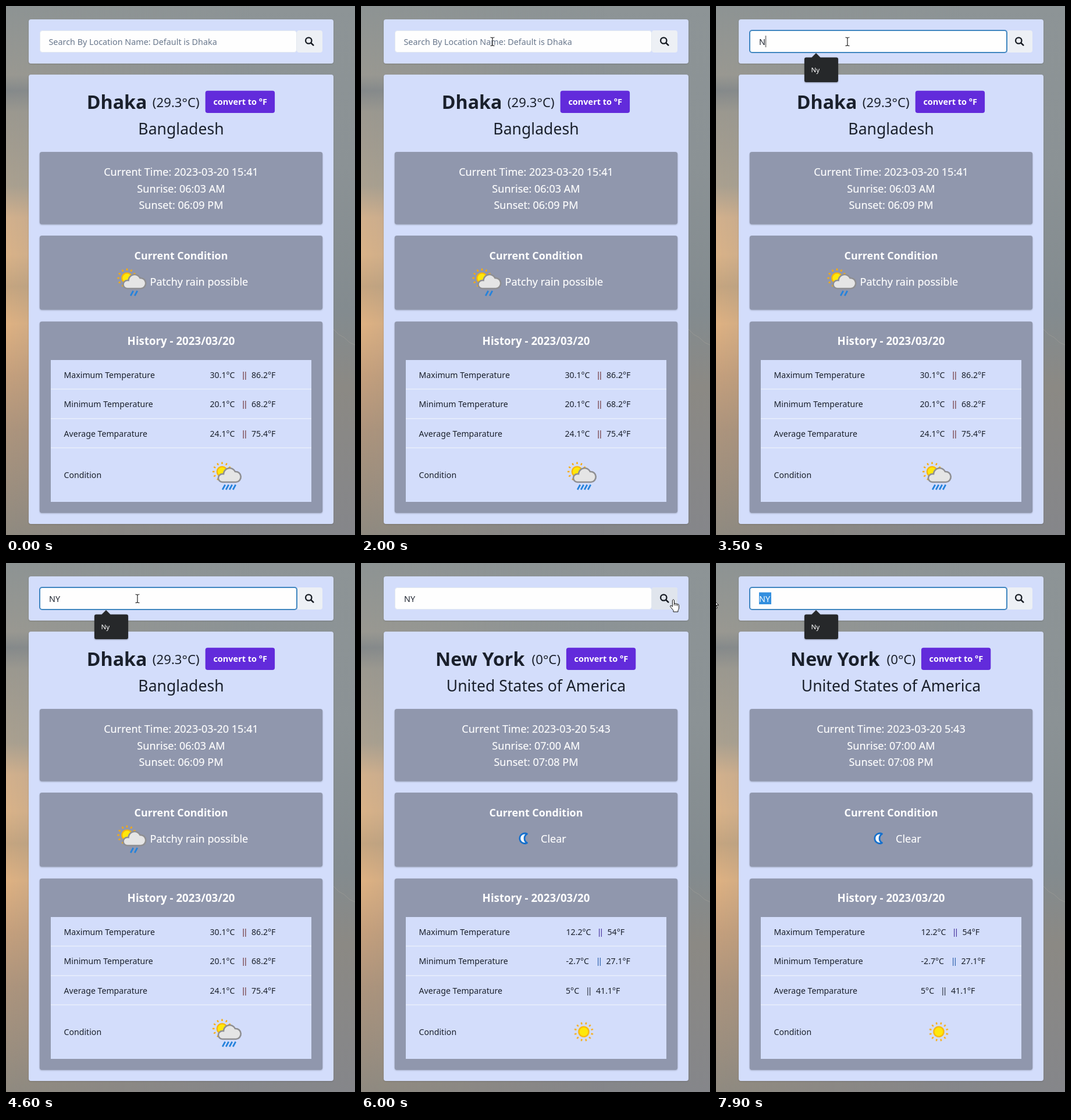
An HTML page for the animation above (8000 ms loop, 600 px wide and 910 px high).

```html
<!DOCTYPE html>
<html lang="en">
<head>
<meta charset="utf-8">
<title>Weather search</title>
<style>
html, body { margin: 0; width: 100%; height: 100%; overflow: hidden; background: #8b9092; }
svg { display: block; width: 600px; height: 910px; font-family: "Noto Sans", "Open Sans", sans-serif; }
.card { fill: #d3ddfb; filter: drop-shadow(0 1px 1px rgba(0,0,0,.15)); }
.panel { fill: #9097ad; filter: drop-shadow(0 1px 1px rgba(0,0,0,.22)); }
.mid { text-anchor: middle; }
.info { font-size: 18.05px; fill: #fff; stroke: #fff; stroke-width: .15px; }
.head { font-size: 17.9px; font-weight: 700; fill: #fff; text-anchor: middle; }
.dark { fill: #1a202c; }
.city { font-size: 32.2px; font-weight: 700; }
.deg { font-size: 22.2px; font-weight: 500; text-anchor: middle; }
.land { font-size: 26.6px; text-anchor: middle; }
.conv { font-size: 14.5px; font-weight: 600; fill: #fff; text-anchor: middle; }
.row { font-size: 14.15px; }
.bar { font-family: "Liberation Sans", Arial, sans-serif; font-size: 14.5px; fill: #6e3338; }
.field { font-size: 14.35px; }
.menu text { font-size: 11.65px; fill: #fff; }
.menu path { fill: #26282a; filter: drop-shadow(0 1px 1px rgba(0,0,0,.35)); }
.ray { stroke: #f9ab0b; stroke-width: 2.4; }

.anim { animation: 8s step-end infinite; }
#before { animation-name: before; }
#after { animation-name: after; }
#focus { animation-name: focus; }
#wide { animation-name: wide; }
#slim { animation-name: slim; animation-timing-function: linear; }
#hint { animation-name: hint; }
#typed { animation-name: typed; }
#second { animation-name: second; }
#caret { animation-name: caret; }
#caretx { animation-name: caretx; }
#chosen { animation-name: chosen; }
#hover, #hand { animation-name: hover; }
#pointer { animation-name: pointer; animation-timing-function: ease-in-out; }
#arrow { animation-name: arrow; }
#beam { animation-name: beam; }

@keyframes before { 0% { opacity: 1 } 73.75%, 100% { opacity: 0 } }
@keyframes after { 0% { opacity: 0 } 73.75%, 100% { opacity: 1 } }
@keyframes focus { 0% { opacity: 0 } 27.5% { opacity: 1 } 67.5% { opacity: 0 } 91.25%, 100% { opacity: 1 } }
@keyframes wide { 0% { opacity: 0 } 28.75% { opacity: 1 } 41.25%, 100% { opacity: 0 } }
@keyframes slim {
  0%, 41.24% { opacity: 0 } 41.25%, 67.5% { opacity: 1 }
  70%, 92.49% { opacity: 0 } 92.5%, 100% { opacity: 1 }
}
@keyframes hint { 0% { opacity: 1 } 41.25%, 100% { opacity: 0 } }
@keyframes typed { 0% { opacity: 0 } 41.25%, 100% { opacity: 1 } }
@keyframes second { 0% { fill-opacity: 0 } 47.5%, 100% { fill-opacity: 1 } }
@keyframes caret {
  0% { opacity: 0 } 27.5% { opacity: 1 } 33.75% { opacity: 0 } 40% { opacity: 1 }
  53.75% { opacity: 0 } 60% { opacity: 1 } 66.25% { opacity: 0 } 91.25% { opacity: 1 } 96%, 100% { opacity: 0 }
}
@keyframes caretx {
  0% { transform: translateX(74.5px) } 41.25% { transform: translateX(85.5px) }
  47.5%, 100% { transform: translateX(95.5px) }
}
@keyframes chosen { 0% { opacity: 0 } 96%, 100% { opacity: 1 } }
@keyframes hover { 0% { opacity: 0 } 64% { opacity: 1 } 87%, 100% { opacity: 0 } }
@keyframes arrow { 0% { opacity: 1 } 21.25% { opacity: 0 } 97%, 100% { opacity: 1 } }
@keyframes beam { 0% { opacity: 0 } 21.25% { opacity: 1 } 64% { opacity: 0 } 87% { opacity: 1 } 97%, 100% { opacity: 0 } }
@keyframes pointer {
  0%, 18.75% { transform: translate(-20px, 70px) }
  24.4%, 57.5% { transform: translate(226px, 61px) }
  65%, 86.25% { transform: translate(537px, 63px) }
  90.6%, 92.5% { transform: translate(226px, 61px) }
  98.75% { transform: translate(-6px, 62px) }
  100% { transform: translate(-20px, 62px) }
}
</style>
</head>
<body>
<svg viewBox="0 0 600 910">
  <defs>
    <linearGradient id="sky" x2="0" y2="1">
      <stop offset="0" stop-color="#8d9496"/><stop offset=".3" stop-color="#8b9295"/>
      <stop offset=".58" stop-color="#838b8f"/><stop offset=".72" stop-color="#8b8984"/>
      <stop offset="1" stop-color="#85868a"/>
    </linearGradient>
    <linearGradient id="dusk" x2="0" y2="1">
      <stop offset="0" stop-color="#8d9393"/><stop offset=".13" stop-color="#999891"/>
      <stop offset=".16" stop-color="#85898a"/><stop offset=".2" stop-color="#9b988f"/>
      <stop offset=".34" stop-color="#aaa08f"/><stop offset=".4" stop-color="#d2b08c"/>
      <stop offset=".47" stop-color="#d9b288"/><stop offset=".53" stop-color="#c5a580"/>
      <stop offset=".6" stop-color="#deb182"/><stop offset=".7" stop-color="#c49f7c"/>
      <stop offset=".8" stop-color="#ad947c"/><stop offset="1" stop-color="#8f8a80"/>
    </linearGradient>
    <linearGradient id="fade">
      <stop offset="0" stop-color="#fff"/><stop offset=".08" stop-color="#ddd"/><stop offset=".7" stop-color="#000"/>
    </linearGradient>
    <mask id="left"><rect width="600" height="910" fill="url(#fade)"/></mask>
    <g id="rays">
      <path id="pair" class="ray" d="M0-13V-16.5M0 13V16.5"/>
      <use href="#pair" transform="rotate(30)"/><use href="#pair" transform="rotate(60)"/>
      <use href="#pair" transform="rotate(90)"/><use href="#pair" transform="rotate(120)"/>
      <use href="#pair" transform="rotate(150)"/>
    </g>
    <g id="sun"><use href="#rays"/><circle r="8.7" fill="#ffe80a" stroke="#f8b50b" stroke-width="2.3"/></g>
    <g id="cloudy">
      <use href="#sun" x="208" y="468"/>
      <path d="M208.5 486A7 7 0 0 1 208.5 472Q209.5 471.8 210.5 472A10.5 10.5 0 0 1 230.5 468A9 9 0 0 1 232 486Z" fill="#e5e5e5" stroke="#8f8f92" stroke-width="2.6"/>
    </g>
    <path id="drop" d="M2.8-4L-1.8 4.5" stroke="#2482dc" stroke-width="2.7"/>
  </defs>

  <rect width="600" height="910" fill="url(#sky)"/>
  <rect width="600" height="910" fill="url(#dusk)" mask="url(#left)"/>
  <path d="M563 556l9 9 9 5 10 9 9 4" fill="none" stroke="#a9a49d" stroke-width=".8" opacity=".6"/>

  <rect class="card" x="39" y="23" width="524" height="76" rx="4"/>
  <rect class="card" x="39" y="118" width="524" height="773" rx="4"/>
  <rect class="panel" x="57.8" y="251" width="486.4" height="124.5" rx="4"/>
  <rect class="panel" x="57.8" y="395" width="486.4" height="127.5" rx="4"/>
  <rect class="panel" x="57.8" y="542.7" width="486.4" height="329.3" rx="4"/>
  <rect x="77" y="609" width="448" height="244" fill="#d3ddfb"/>
  <path d="M77 659H525M77 709.7H525M77 760H525" stroke="#e9effc" stroke-width="1.4"/>

  <text class="head" x="301" y="435.5">Current Condition</text>
  <text class="head" x="301" y="583.3" style="font-size:18.7px">History - 2023/03/20</text>
  <g class="row dark">
    <text x="99.5" y="640">Maximum Temperature</text>
    <text x="99.5" y="690.3">Minimum Temperature</text>
    <text x="99.5" y="740.6">Average Temparature</text>
    <text x="99.5" y="812">Condition</text>
  </g>

  <g id="before" class="anim">
    <text class="city dark" x="138.7" y="177">Dhaka</text>
    <text class="deg dark" x="292.3" y="174">(29.3°C)</text>
    <rect x="342.7" y="145.7" width="119.4" height="38.3" rx="4" fill="#622bdb"/>
    <text class="conv" x="402.7" y="170.3">convert to °F</text>
    <text class="land dark" x="301" y="221">Bangladesh</text>
    <g class="info">
      <text class="mid" x="301" y="292">Current Time: 2023-03-20 15:41</text>
      <text class="mid" x="301" y="320.7">Sunrise: 06:03 AM</text>
      <text class="mid" x="301" y="349.3">Sunset: 06:09 PM</text>
      <text x="247.5" y="480.7">Patchy rain possible</text>
    </g>
    <use href="#cloudy"/>
    <use href="#drop" x="216" y="494"/><use href="#drop" x="223" y="494"/>
    <g class="row dark">
      <text x="350.5" y="640">30.1°C</text><text class="bar" x="406.2" y="640">||</text><text x="422" y="640">86.2°F</text>
      <text x="350.5" y="690.3">20.1°C</text><text class="bar" x="406.2" y="690.3">||</text><text x="422" y="690.3">68.2°F</text>
      <text x="350.5" y="740.6">24.1°C</text><text class="bar" x="406.2" y="740.6">||</text><text x="422" y="740.6">75.4°F</text>
    </g>
    <use href="#cloudy" x="163.5" y="333"/>
    <use href="#drop" x="374" y="827.5"/><use href="#drop" x="380" y="827.5"/>
    <use href="#drop" x="386" y="827.5"/><use href="#drop" x="392" y="827.5"/>
  </g>

  <g id="after" class="anim" opacity="0">
    <text class="city dark" x="128" y="177">New York</text>
    <text class="deg dark" x="318.3" y="174">(0°C)</text>
    <rect x="352.9" y="145.7" width="119.4" height="38.3" rx="4" fill="#622bdb"/>
    <text class="conv" x="412.9" y="170.3">convert to °F</text>
    <text class="land dark" x="301" y="221">United States of America</text>
    <g class="info">
      <text class="mid" x="301" y="292">Current Time: 2023-03-20 5:43</text>
      <text class="mid" x="301" y="320.7">Sunrise: 07:00 AM</text>
      <text class="mid" x="301" y="349.3">Sunset: 07:08 PM</text>
      <text x="309" y="480.7">Clear</text>
    </g>
    <path d="M285.5 466A8.7 8.7 0 1 0 285.5 481.5A9 9 0 0 1 285.5 466Z" fill="#f4f8fc" stroke="#1670cc" stroke-width="2.8" stroke-linejoin="round"/>
    <g class="row dark">
      <text x="352.5" y="640">12.2°C</text><text class="bar" x="407.7" y="640" style="fill:#4b36a0">||</text><text x="423.5" y="640">54°F</text>
      <text x="352.5" y="690.3">-2.7°C</text><text class="bar" x="405.7" y="690.3" style="fill:#2e62ad">||</text><text x="421.5" y="690.3">27.1°F</text>
      <text x="352" y="740.6">5°C</text><text class="bar" x="388" y="740.6" style="fill:#2d3340">||</text><text x="404" y="740.6">41.1°F</text>
    </g>
    <use href="#sun" transform="translate(383 806.3) rotate(15)"/>
  </g>

  <rect x="500" y="42" width="44" height="38" rx="4" fill="#edf0f5"/>
  <rect id="hover" class="anim" x="500" y="42" width="44" height="38" rx="4" fill="#e0e5ed" opacity="0"/>
  <g fill="none" stroke="#151a22" stroke-width="2.3" stroke-linecap="round">
    <circle cx="520.3" cy="59.5" r="5.2"/><path d="M524.4 63.6L528.3 67.4" stroke-width="2.7"/>
  </g>
  <rect x="58.5" y="42.5" width="441" height="37" rx="4" fill="#fefefe" stroke="#e2e8f0"/>
  <rect id="focus" class="anim" x="58" y="42" width="442" height="38" rx="4" fill="#fefefe" stroke="#4086c0" stroke-width="2" opacity="0"/>
  <g class="field">
    <text id="hint" class="anim" x="73.5" y="66.5" fill="#68778c">Search By Location Name: Default is Dhaka</text>
    <g id="typed" class="anim dark" opacity="0"><text x="74" y="66.5">N<tspan id="second" class="anim">Y</tspan></text></g>
    <g id="chosen" class="anim" opacity="0">
      <rect x="74" y="50.5" width="21" height="20.5" fill="#338fdf"/>
      <text x="74" y="66.5" fill="#fff">NY</text>
    </g>
  </g>
  <g id="caretx" class="anim"><path id="caret" class="anim" d="M0 51V71" stroke="#222" opacity="0"/></g>

  <g id="wide" class="menu anim" opacity="0">
    <path d="M155 88.5H164.5L172 81L179.5 88.5H321a3 3 0 0 1 3 3V299a3 3 0 0 1-3 3H155a3 3 0 0 1-3-3V91.5a3 3 0 0 1 3-3Z"/>
    <text x="163.5" y="114">Mumbai</text>
    <text x="163.5" y="148.3">Babugonj</text>
    <text x="163.5" y="182.6">Ny</text>
    <text x="163.5" y="216.9">public_html/dao.spxa.info</text>
    <text x="163.5" y="251.2">public_html/ar.spxa.info</text>
    <text x="163.5" y="285.5">Rahmatpur</text>
  </g>
  <g id="slim" class="menu anim" opacity="0">
    <path d="M155 88.5H164.5L172 81L179.5 88.5H207a3 3 0 0 1 3 3V128a3 3 0 0 1-3 3H155a3 3 0 0 1-3-3V91.5a3 3 0 0 1 3-3Z"/>
    <text x="163.5" y="114">Ny</text>
  </g>

  <g id="pointer" class="anim">
    <path id="arrow" class="anim" d="M0 0V14.5L3.4 11.3L5.7 16.5L8 15.5L5.8 10.4H10.5Z" fill="#fff" stroke="#111"/>
    <path id="beam" class="anim" d="M-3.5-7Q0-7 0-5.5Q0-7 3.5-7M0-6V6M-3.5 7.5Q0 7.5 0 6Q0 7.5 3.5 7.5" fill="none" stroke="#222" stroke-width="1.2" opacity="0"/>
    <path id="hand" class="anim" d="M-1.6 1Q0-1.6 1.5 1V7Q3.2 5.5 4.3 7.3Q6 6.2 7 8Q9 7 9.6 9.5V14Q9.5 17 8 18.5V21H0V18.5L-5 12.5Q-6 10.2-4 10L-1.6 12ZM1.5 7V10M4.3 7.5V10.5M7 8.3V11" fill="#fff" stroke="#111" stroke-linejoin="round" opacity="0"/>
  </g>
</svg>
</body>
</html>
```
